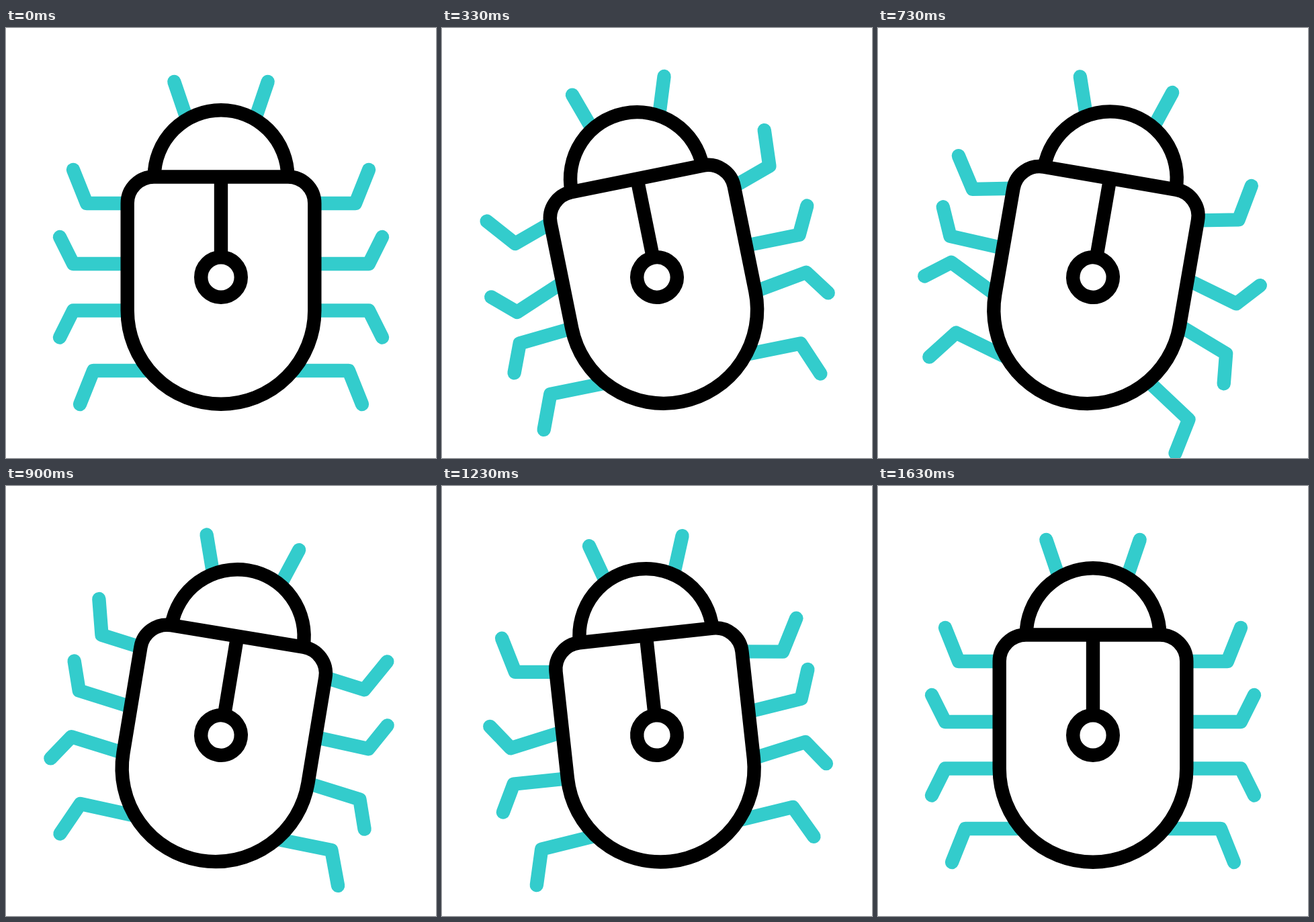
Animation, 640 px wide and 640 px high, one loop 1670 ms. Source, as an HTML page with a canvas:

```html
<!DOCTYPE html>
<html lang="en">
<head>
<meta charset="utf-8">
<title>Bug</title>
<style>
  html, body { margin: 0; width: 100%; height: 100%; overflow: hidden; background: #fff; }
  canvas { display: block; width: 100vw; height: 100vh; }
</style>
</head>
<body>
<canvas id="stage" width="640" height="640"></canvas>
<script>
const ctx = document.getElementById('stage').getContext('2d');
const LOOP = 1670, STEP = 100 / 3, REST = 49;
const TEAL = '#33cccc', BLACK = '#000', WHITE = '#fff';
const PIVOT = { x: 320, y: 371 };

// Body tilt in degrees at its turning points
const tilt = { at: [0, 12.3, 24.2, 36, 44.5], deg: [0, -12.6, 12, -6.5, 0] };

// Leg swing relative to the body
const legTimes = [0, 10, 16, 22, 27, 32, 36.5, 41, 48];
const front = [0, -18.5, 37, -10.8, 8, 7.6, 6, 19, 8];
const small = [0, 0, -15.6, 16.3, 3, 7.5, -8, 2.6, 7];

// side, hip x/y, knee x, foot dx/dy, swing
const legs = [
  [1, 140, 261, 200, 20, -50, front],
  [-1, 140, 261, 200, 20, -50, front],
  [1, 140, 351, 220, 20, -40, small],
  [-1, 140, 351, 220, 20, -40, [0, -21.7, 17, 3, 8, 13.7, -12, 15.7, 5]],
  [1, 140, 420.5, 220, 20, 40, [0, -9, -7.6, 21.2, 8, 20.4, -12, 11.7, 4]],
  [-1, 140, 420.5, 220, 20, 40, [0, -4.6, -16, 26.3, 8, 23.6, 0, 9.3, 6]],
  [1, 108, 510, 190, 20, 50, [0, 0, -24.7, 33.6, 2, 15.8, -8, 6.5, 7]],
  [-1, 108, 510, 190, 20, 50, small]
];

const rad = deg => deg * Math.PI / 180;

// Smooth curve through the keys that never overshoots them
function curve(at, val, f) {
  const last = at.length - 1;
  if (f >= at[last]) return val[last];
  const slope = i => (val[i + 1] - val[i]) / (at[i + 1] - at[i]);
  const tangent = i => {
    if (i === 0 || i === last) return 0;
    const a = slope(i - 1), b = slope(i);
    return a * b > 0 ? 2 * a * b / (a + b) : 0;
  };
  let i = 0;
  while (f >= at[i + 1]) i++;
  const h = at[i + 1] - at[i], u = (f - at[i]) / h, v = 1 - u;
  return val[i] * (1 + 2 * u) * v * v + tangent(i) * h * u * v * v
    + val[i + 1] * u * u * (3 - 2 * u) - tangent(i + 1) * h * u * u * v;
}

function line(color, ...points) {
  ctx.beginPath();
  points.forEach(([x, y]) => ctx.lineTo(x, y));
  ctx.strokeStyle = color;
  ctx.stroke();
}

function outline() {
  ctx.fillStyle = WHITE;
  ctx.strokeStyle = BLACK;
  ctx.fill();
  ctx.stroke();
}

function drawLeg([side, hipX, hipY, kneeX, dx, dy, swing], f) {
  const knee = side * (kneeX - hipX);
  ctx.save();
  ctx.translate(320 + side * hipX, hipY);
  ctx.rotate(rad(f < REST ? curve(legTimes, swing, f) : 0));
  line(TEAL, [0, 0], [knee, 0], [knee + side * dx, dy]);
  ctx.restore();
}

function drawBody() {
  ctx.lineCap = 'butt';
  ctx.beginPath();
  ctx.arc(320, 221.5, 99.3, Math.PI, 0);
  outline();

  ctx.beginPath();
  ctx.moveTo(320, 221.5);
  ctx.arcTo(459.3, 221.5, 459.3, 261, 39.5);
  ctx.lineTo(459.3, 420.5);
  ctx.arc(320, 420.5, 139.3, 0, Math.PI);
  ctx.arcTo(180.7, 221.5, 320, 221.5, 39.5);
  ctx.closePath();
  outline();

  line(BLACK, [320, 221.5], [320, 341]);
  ctx.beginPath();
  ctx.arc(320, 371, 29.8, 0, 2 * Math.PI);
  outline();
}

function draw(f) {
  ctx.fillStyle = WHITE;
  ctx.fillRect(0, 0, 640, 640);
  ctx.save();
  ctx.translate(PIVOT.x, PIVOT.y);
  ctx.rotate(rad(curve(tilt.at, tilt.deg, f)));
  ctx.translate(-PIVOT.x, -PIVOT.y);
  ctx.lineWidth = 20.4;
  ctx.lineCap = ctx.lineJoin = 'round';
  legs.forEach(leg => drawLeg(leg, f));
  for (const side of [-1, 1]) {
    line(TEAL, [320 + side * 69.7, 80], [320 + side * 52, 132]);
  }
  drawBody();
  ctx.restore();
}

function tick() {
  const t = performance.now() % LOOP;
  draw(Math.min(REST, Math.floor((t + 4) / STEP)));
  requestAnimationFrame(tick);
}
tick();
</script>
</body>
</html>
```
